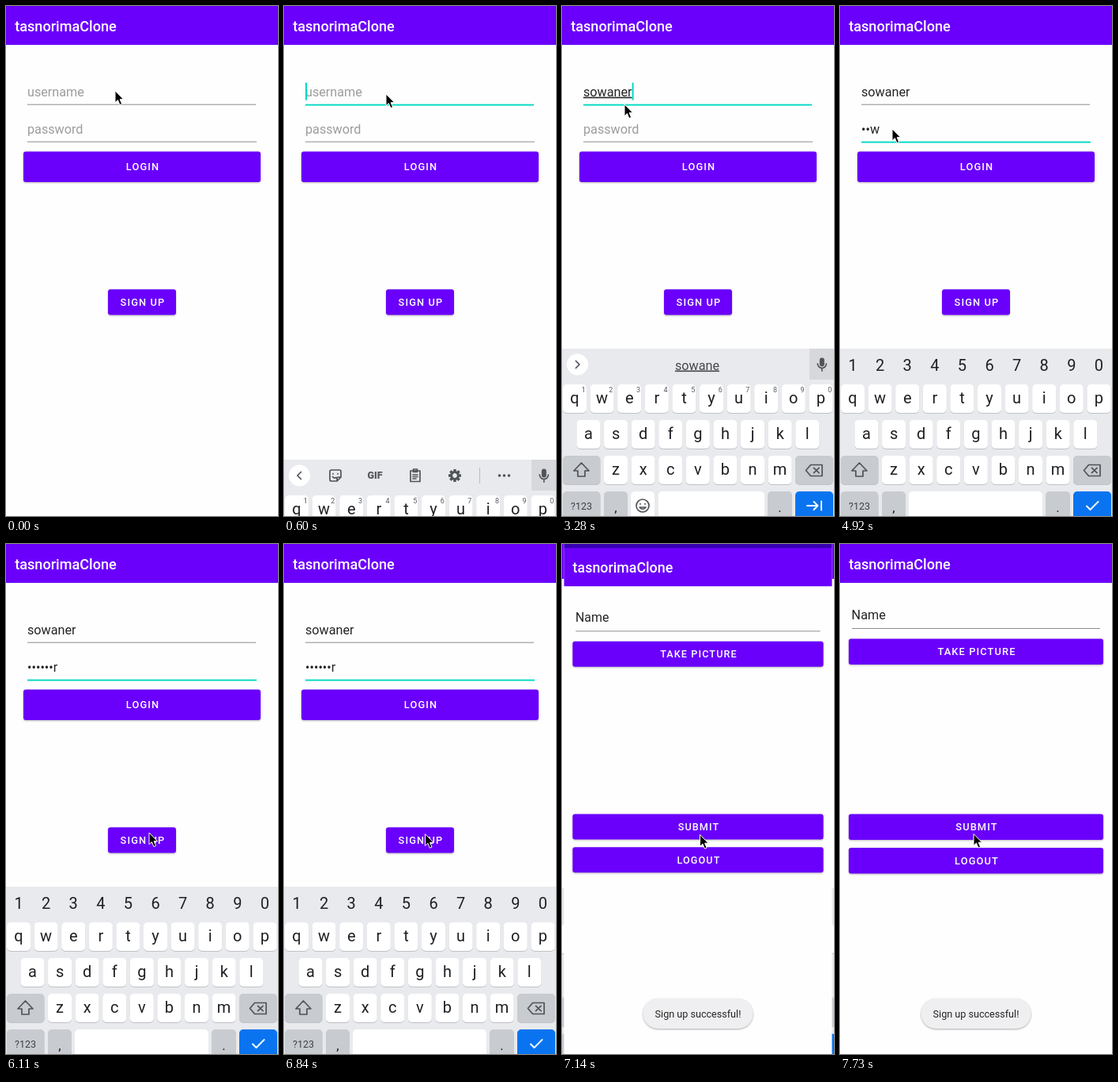
An HTML page for the animation above (8 s loop, 344 px wide and 643 px high).

```html
<!DOCTYPE html>
<html lang="en">
<head>
<meta charset="utf-8">
<title>Sign up flow</title>
<style>
  html, body { margin: 0; width: 100%; height: 100%; overflow: hidden; background: #fefefe; }
  svg { display: block; width: 344px; height: 643px; font-family: Roboto, sans-serif; }
  text { white-space: pre; }
  .title { font-size: 18.1px; font-weight: 500; fill: #fff; }
  .field { font-size: 16.2px; fill: #242424; }
  .hint { fill: #9c9c9c; }
  .label { font-size: 12.8px; font-weight: 500; letter-spacing: 1.14px; fill: #fff; text-anchor: middle; }
  .button { fill: #6a00fb; filter: drop-shadow(0 1px 1px rgba(0, 0, 0, .28)); }
  .letter { font-size: 20px; fill: #1f2023; text-anchor: middle; }
  .small { font-size: 9px; fill: #55585c; text-anchor: middle; }
  .icon { fill: none; stroke: #505357; stroke-width: 1.7; stroke-linejoin: round; stroke-linecap: round; }
  .white { stroke: #fff; stroke-width: 1.9; }
  .caret { fill: #03dac5; }
</style>
</head>
<body>
<svg id="stage" viewBox="0 0 344 643"></svg>
<script>
const LOOP = 8000, STEP = 148.6;
const NAME = 'sowaner', TITLE = 'tasnorimaClone';
const PURPLE = '#6a00fb';
const PITCH = 34.6;

const rect = (x, y, w, h, fill, r = 0, extra = '') =>
  `<rect x="${x}" y="${y}" width="${w}" height="${h}" rx="${r}" fill="${fill}" ${extra}/>`;
const text = (x, y, cls, s, extra = '') =>
  `<text x="${x}" y="${y}" class="${cls}" ${extra}>${s}</text>`;
const icon = (x, y, d, cls = '') =>
  `<path class="icon ${cls}" transform="translate(${x} ${y})" d="${d}"/>`;
const group = (id, body) => `<g id="${id}">${body}</g>`;
const button = (x, y, w, h, label) =>
  `<rect class="button" x="${x}" y="${y}" width="${w}" height="${h}" rx="3"/>` +
  text(x + w / 2 + 1, y + h / 2 + 4.6, 'label', label);
const header = rect(0, 0, 344, 49, PURPLE) + text(11.2, 31.6, 'title', TITLE);

const key = (x, y, w, fill = '#fff') =>
  rect(x, y + 1, w, 36, '#bfc2c7', 5) + rect(x, y, w, 36, fill, 5);
const GREY = '#c8cbd0';

const letterRow = (letters, x, y) => [...letters].map((c, i) =>
  key(x - 15 + i * PITCH, y, 30) + text(x + i * PITCH, y + 24, 'letter', c)).join('');
const digits = (x, y, cls) => [...'1234567890'].map((d, i) =>
  text(x + i * PITCH, y, cls, d)).join('');

const mic = rect(313, 432, 31, 39, '#d6d8dc') +
  rect(325.8, 443.5, 6, 11, '#505357', 3) +
  icon(328.8, 452, 'M-5.5 -1 a5.5 5.5 0 0 0 11 0 M0 4.8 V8');
const chevron = d => '<circle cx="19.5" cy="452" r="13.5" fill="#fff"/>' + icon(19.5, 452, d);

// Eight teeth around the gear's rim.
const teeth = Array.from({ length: 8 }, (_, i) =>
  `<rect x="-1.7" y="-8" width="3.4" height="4" rx=".6" transform="rotate(${i * 45})"/>`).join('');

const tools = chevron('M2 -4.5 L-2.5 0 L2 4.5') +
  icon(65, 452, 'M-5 -7 H5 Q7 -7 7 -5 V2 L2 7 H-5 Q-7 7 -7 5 V-5 Q-7 -7 -5 -7 Z M7 2 H4 Q2 2 2 4 V7 M-3 -2.5 V-2 M3 -2.5 V-2 M-3.5 1.5 Q-1.5 4 1 2.5') +
  text(115, 456, 'small', 'GIF', 'style="font-size:12.5px;font-weight:900"') +
  icon(166, 452, 'M-6 -6 H6 V7.5 H-6 Z M-2.5 -8 H2.5 V-4.5 H-2.5 Z M-3 -1 H3 M-3 1.5 H3 M-3 4 H1') +
  `<g transform="translate(216 452)" fill="#505357">${teeth}<circle r="4.4" fill="none" stroke="#505357" stroke-width="3"/></g>` +
  rect(247, 442, 1, 20, '#b9bcc1') +
  [272.5, 278.5, 284.5].map(x => `<circle cx="${x}" cy="452" r="1.8" fill="#505357"/>`).join('') + mic;

const suggestions = chevron('M-2 -4.5 L2.5 0 L-2 4.5') +
  text(171, 458.5, 'field', '', 'id="guess" text-anchor="middle" text-decoration="underline" style="fill:#45484c"') + mic;

const textKeys = digits(27.3, 487.3, 'small') + key(87, 612, 30) + key(121.5, 612, 134.5) +
  icon(102, 630, 'M-8 0 a8 8 0 1 0 16 0 a8 8 0 1 0 -16 0 M-3 -2.5 V-2 M3 -2.5 V-2 M-4 2 Q0 6.5 4 2 Z') +
  icon(319, 630, 'M-9 0 H4 M-.5 -5 L4.5 0 L-.5 5 M9 -5.5 V5.5', 'white');
const passKeys = key(87, 612, 169) + icon(319, 630, 'M-7 .5 L-2.5 5 L7.5 -5', 'white');

const keyboard = rect(-4, 432, 352, 220, '#e8eaed') +
  letterRow('qwertyuiop', 16, 477) + letterRow('asdfghjkl', 33.5, 522) + letterRow('zxcvbnm', 68, 567) +
  key(1, 567, 47.5, GREY) + icon(24.5, 585, 'M0 -9 L9.5 1 H4.5 V8 H-4.5 V1 H-9.5 Z') +
  key(295, 567, 48, GREY) + icon(319, 585.5, 'M-4.5 -7 H10 V7 H-4.5 L-10.5 0 Z M-.5 -3.2 L6 3.2 M6 -3.2 L-.5 3.2') +
  key(1, 612, 47.5, GREY) + text(24.5, 635, 'letter', '?123', 'style="font-size:12.5px;fill:#3d4044"') +
  key(53, 612, 30, GREY) + text(68, 638, 'letter', ',', 'style="font-size:17px"') +
  key(260, 612, 31, GREY) + text(275.5, 638, 'letter', '.', 'style="font-size:17px"') +
  key(295, 612, 48, '#0a74f0') +
  group('tools', tools) + group('suggestions', suggestions) + group('textKeys', textKeys) +
  group('passKeys', passKeys + digits(16, 460, 'letter'));

const field = (id, y, end, hint) =>
  text(27, y, 'field hint', hint, `id="${id}Hint"`) + text(27, y, 'field', '', `id="${id}"`) +
  rect(27, y + 10, end - 27, 1, '#8e8e8e', 0, `id="${id}Line"`) +
  `<rect id="${id}Caret" class="caret" y="${y - 17}" width="2" height="22"/>`;

const login = rect(-4, 0, 352, 643, '#fefefe') + rect(-4, -8, 352, 10, PURPLE) +
  rect(-4, 0, 352, 49, PURPLE) + header +
  field('user', 113.7, 316, 'username') + field('pass', 160.7, 317, 'password') +
  button(22, 183.5, 300, 38.5, 'LOGIN') + button(129, 357.2, 86, 32.3, 'SIGN UP') +
  group('keyboard', keyboard);

const profile = rect(0, -20, 344, 674, '#fefefe') + rect(0, -20, 344, 20, '#3700b3') +
  rect(0, 654, 344, 46, '#000') + header +
  text(14.6, 94.7, 'field', 'Name') + rect(15, 106, 314, 1, '#8e8e8e') +
  button(11, 119.5, 322, 32.5, 'TAKE PICTURE') +
  button(11, 340.5, 322, 32.5, 'SUBMIT') + button(11, 383, 322, 32.5, 'LOGOUT');

const toast = rect(102.5, 573, 139, 38, '#efeff1', 19, 'id="pill" style="filter:drop-shadow(0 1px 1.2px rgba(0,0,0,.32))"') +
  text(172, 597.4, '', 'Sign up successful!', 'id="toastText" text-anchor="middle" font-size="12.6" fill="#242424"');

const pointer = '<path d="M0 0 V14.8 L3.4 11.6 L5.9 17.6 L8.6 16.4 L6.1 10.7 H10.6 Z" fill="#000" stroke="#fff" stroke-width="1"/>';

document.getElementById('stage').innerHTML = group('login', login) + group('profile', profile) +
  group('toast', toast) + group('pointer', pointer);

const el = {};
document.querySelectorAll('#stage [id]').forEach(e => el[e.id] = e);
const show = (id, on) => el[id].setAttribute('display', on ? 'inline' : 'none');
const scale = (id, s, cy) =>
  el[id].setAttribute('transform', `translate(172 ${cy}) scale(${s}) translate(-172 ${-cy})`);
const within = (n, a, b) => n >= a && n <= b;

// Pointer stops: step, x, y.
const PATH = [[0, 138, 107], [1, 138, 107], [7, 120, 115], [16, 120, 115], [22, 79, 124],
  [23, 78, 126], [26, 66, 155], [36, 66, 155], [39, 183, 353], [41, 181, 364],
  [47, 178, 366], [49, 171, 367], [50, 171, 367], [52, 169, 365.5]];

function pointerAt(n) {
  const i = PATH.findIndex(p => p[0] >= n);
  if (i < 0) return PATH[PATH.length - 1].slice(1);
  if (i === 0) return PATH[0].slice(1);
  const [a, b] = [PATH[i - 1], PATH[i]];
  const k = (n - a[0]) / (b[0] - a[0]);
  return [1, 2].map(j => a[j] + (b[j] - a[j]) * k);
}

const nameLength = n => n < 17 ? 0 : [1, 2, 3, 5, 6, 7][Math.min(n - 17, 5)];

function password(n) {
  const len = n < 28 ? 0 : n < 30 ? n - 27 : n < 33 ? 2 : Math.min(n - 30, 7);
  const masked = within(n, 30, 32) || n >= 47;
  return masked || !len ? '•'.repeat(len) : '•'.repeat(len - 1) + NAME[len - 1];
}

function setField(id, value, focused, caret, composing) {
  el[id].textContent = value;
  el[id].setAttribute('text-decoration', composing ? 'underline' : 'none');
  show(id + 'Hint', !value);
  el[id + 'Line'].setAttribute('fill', focused ? '#03dac5' : '#8e8e8e');
  el[id + 'Line'].setAttribute('height', focused ? 1.9 : 1);
  show(id + 'Caret', caret);
  if (caret) el[id + 'Caret'].setAttribute('x', 27 + (value ? el[id].getComputedTextLength() : 0));
}

function draw(n) {
  const onUser = within(n, 4, 25), onPass = n >= 26;
  const userCaret = within(n, 4, 6) || within(n, 10, 12) || within(n, 17, 25);
  const passCaret = within(n, 26, 32) || within(n, 34, 39);
  setField('user', NAME.slice(0, nameLength(n)), onUser, userCaret, onUser);
  setField('pass', password(n), onPass, passCaret, false);

  const slide = n < 4 ? 220 : [140, 55, 16, 0][Math.min(n - 4, 3)];
  el.keyboard.setAttribute('transform', `translate(0 ${slide})`);
  show('tools', n < 17);
  show('suggestions', within(n, 17, 26));
  show('textKeys', n < 27);
  show('passKeys', n >= 27);
  el.guess.textContent = NAME.slice(0, Math.max(1, nameLength(n - 1)));

  const opening = n === 47;
  scale('login', n < 47 ? 1 : 1.0185, 325);
  scale('profile', opening ? .912 : n === 48 ? .985 : 1, 334);
  el.profile.setAttribute('opacity', opening ? .35 : 1);
  show('profile', n >= 47);

  show('toast', n >= 47);
  scale('toast', opening ? .985 : 1, 592);
  el.pill.setAttribute('opacity', opening ? .85 : 1);
  el.toastText.setAttribute('opacity', opening ? .45 : 1);

  el.pointer.setAttribute('transform', `translate(${pointerAt(n)})`);
}

const start = performance.now();
function tick() {
  const t = (performance.now() - start) % LOOP;
  draw(Math.floor(t / STEP + .05));
  requestAnimationFrame(tick);
}
tick();
</script>
</body>
</html>
```
